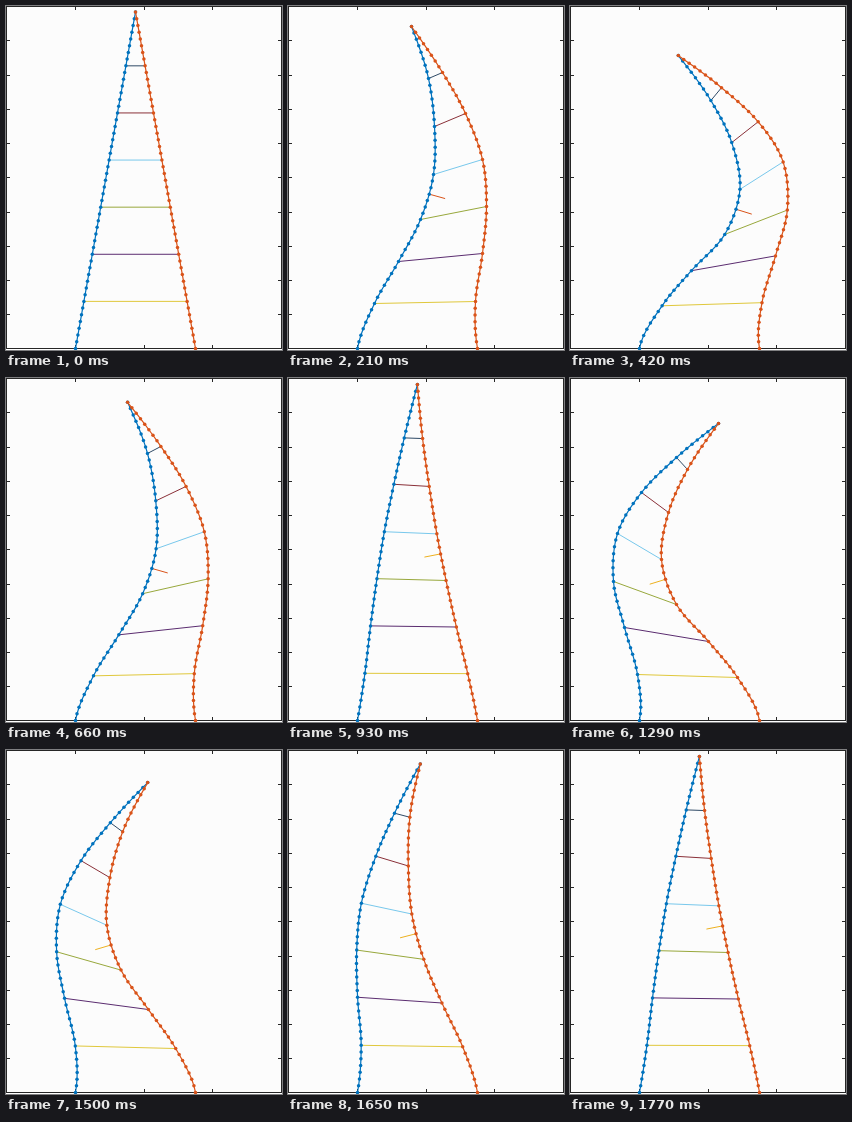
Write an HTML page with a canvas that moves like this. It is 276 px wide and 344 px high and loops after 1.8 s.

```html
<!DOCTYPE html>
<html lang="en">
<head>
<meta charset="utf-8">
<title>Flexible finger bending</title>
<style>
  html, body { margin: 0; width: 276px; height: 344px; overflow: hidden; background: #fff; }
  canvas { display: block; }
</style>
</head>
<body>
<canvas id="stage" width="276" height="344"></canvas>
<script>
const ctx = document.getElementById('stage').getContext('2d');

const STEP = 30, HALF = 30;
const MID = 129, BASE_Y = 342, TIP_Y = 5.5, HALF_WIDTH = 60;
const NODES = 50, LOAD_NODE = 25, LOAD_LENGTH = 16.5;
const KNOTS = [0, 7, 14, 21, 28, 35, 42, 50];
const BLUE = '#0072bd', ORANGE = '#d95319', AMBER = '#edb120';
const RUNG_COLORS = ['#e0c83c', '#5b2c70', '#98a83c', '#78c8ec', '#8a3038', '#2f4a66'];

// Knot positions from base to tip under a medium and a strong load, bending right.
const MEDIUM = {
  near: [[69, 342], [86, 297], [110, 255], [132, 213], [145, 168], [146, 120], [140, 72], [123, 20]],
  far: [[189, 342], [187, 295], [194, 247], [198, 200], [194, 153], [177, 107], [154, 66], [123, 20]]
};
const STRONG = {
  near: [[69, 342], [91, 299], [120, 263], [152, 226], [167, 181], [160, 134], [141, 91], [110, 45]],
  far: [[189, 342], [191, 296], [204, 249], [215, 203], [211, 155], [187, 114], [152, 79], [110, 45]]
};

const soften = n => Math.sin(0.07 * n);
const Q1 = soften(7), Q2 = soften(13);

// Quadratic in the softened load, passing through rest, medium and strong.
function blend(rest, medium, strong, q) {
  const a = (medium - rest) / Q1, b = (strong - rest) / Q2;
  const curve = (b - a) / (Q2 - Q1);
  return rest + q * (a + curve * (q - Q1));
}

function restPoint(node, sign) {
  const u = node / NODES;
  return [MID + sign * HALF_WIDTH * (1 - u), BASE_Y + (TIP_Y - BASE_Y) * u];
}

// Cubic through the knots; the base keeps its resting direction.
function sampleAxis(values, baseSlope) {
  const last = KNOTS.length - 1;
  const h = i => KNOTS[i + 1] - KNOTS[i];
  const slope = i => (values[i + 1] - values[i]) / h(i);
  const tangent = KNOTS.map((_, i) => {
    if (i === 0) return baseSlope;
    if (i === last) return 0;
    return (slope(i - 1) * h(i) + slope(i) * h(i - 1)) / (h(i - 1) + h(i));
  });
  tangent[last] = 1.5 * slope(last - 1) - 0.5 * tangent[last - 1];

  const out = [];
  for (let node = 0, i = 0; node <= NODES; node++) {
    if (node > KNOTS[i + 1]) i++;
    const w = h(i), t = (node - KNOTS[i]) / w, s = 1 - t;
    out.push(s * s * (1 + 2 * t) * values[i] + t * t * (3 - 2 * t) * values[i + 1]
      + w * t * s * (s * tangent[i] - t * tangent[i + 1]));
  }
  return out;
}

function sidePoints(side, load, dir) {
  const sign = side === 'near' ? -1 : 1;
  const q = soften(load);
  const axis = c => {
    const values = KNOTS.map((node, i) =>
      blend(restPoint(node, sign)[c], MEDIUM[side][i][c], STRONG[side][i][c], q));
    return sampleAxis(values, restPoint(1, sign)[c] - restPoint(0, sign)[c]);
  };
  const xs = axis(0), ys = axis(1);
  return xs.map((x, i) => [MID + dir * (x - MID), ys[i]]);
}

function drawLine(points, color, width) {
  ctx.strokeStyle = color;
  ctx.lineWidth = width;
  ctx.beginPath();
  points.forEach(p => ctx.lineTo(p[0], p[1]));
  ctx.stroke();
}

function drawSide(points, color) {
  drawLine(points, color, 1.2);
  ctx.fillStyle = color;
  for (const [x, y] of points) {
    ctx.beginPath();
    ctx.arc(x, y, 1.75, 0, 2 * Math.PI);
    ctx.fill();
  }
}

function drawLoad(points, dir) {
  const [x, y] = points[LOAD_NODE];
  const a = points[LOAD_NODE - 1], b = points[LOAD_NODE + 1];
  const dx = b[0] - a[0], dy = b[1] - a[1];
  const k = dir * LOAD_LENGTH / Math.hypot(dx, dy);
  drawLine([[x, y], [x - dy * k, y + dx * k]], dir > 0 ? ORANGE : AMBER, 1);
}

function drawAxes() {
  ctx.fillStyle = '#fff';
  ctx.fillRect(0, 0, 276, 344);
  ctx.fillStyle = '#fcfcfc';
  ctx.fillRect(0, 0, 276, 342);
  ctx.fillStyle = '#262626';
  ctx.fillRect(0, 0, 276, 1);
  ctx.fillRect(0, 342, 276, 1);
  ctx.fillRect(0, 0, 1, 343);
  ctx.fillRect(275, 0, 1, 343);
  for (const x of [69, 138, 206]) {
    ctx.fillRect(x, 1, 1, 3);
    ctx.fillRect(x, 339, 1, 3);
  }
  for (let i = 1; i < 10; i++) {
    const y = Math.round(i * 34.25);
    ctx.fillRect(1, y, 3, 1);
    ctx.fillRect(272, y, 3, 1);
  }
}

function draw(time) {
  const step = Math.floor(time / STEP) % (2 * HALF);
  const dir = step < HALF ? 1 : -1;
  const load = HALF / 2 - Math.abs(HALF / 2 - step % HALF);
  const near = sidePoints('near', load, dir);
  const far = sidePoints('far', load, dir);

  drawAxes();
  ctx.save();
  ctx.translate(0.5, 0.5);
  RUNG_COLORS.forEach((color, i) => {
    const node = KNOTS[i + 1];
    drawLine([near[node], far[node]], color, 1);
  });
  if (load > 0) drawLoad(near, dir);
  drawSide(dir > 0 ? near : far, BLUE);
  drawSide(dir > 0 ? far : near, ORANGE);
  ctx.restore();
}

const start = performance.now();
function tick() {
  draw(performance.now() - start);
  requestAnimationFrame(tick);
}
tick();
</script>
</body>
</html>
```
